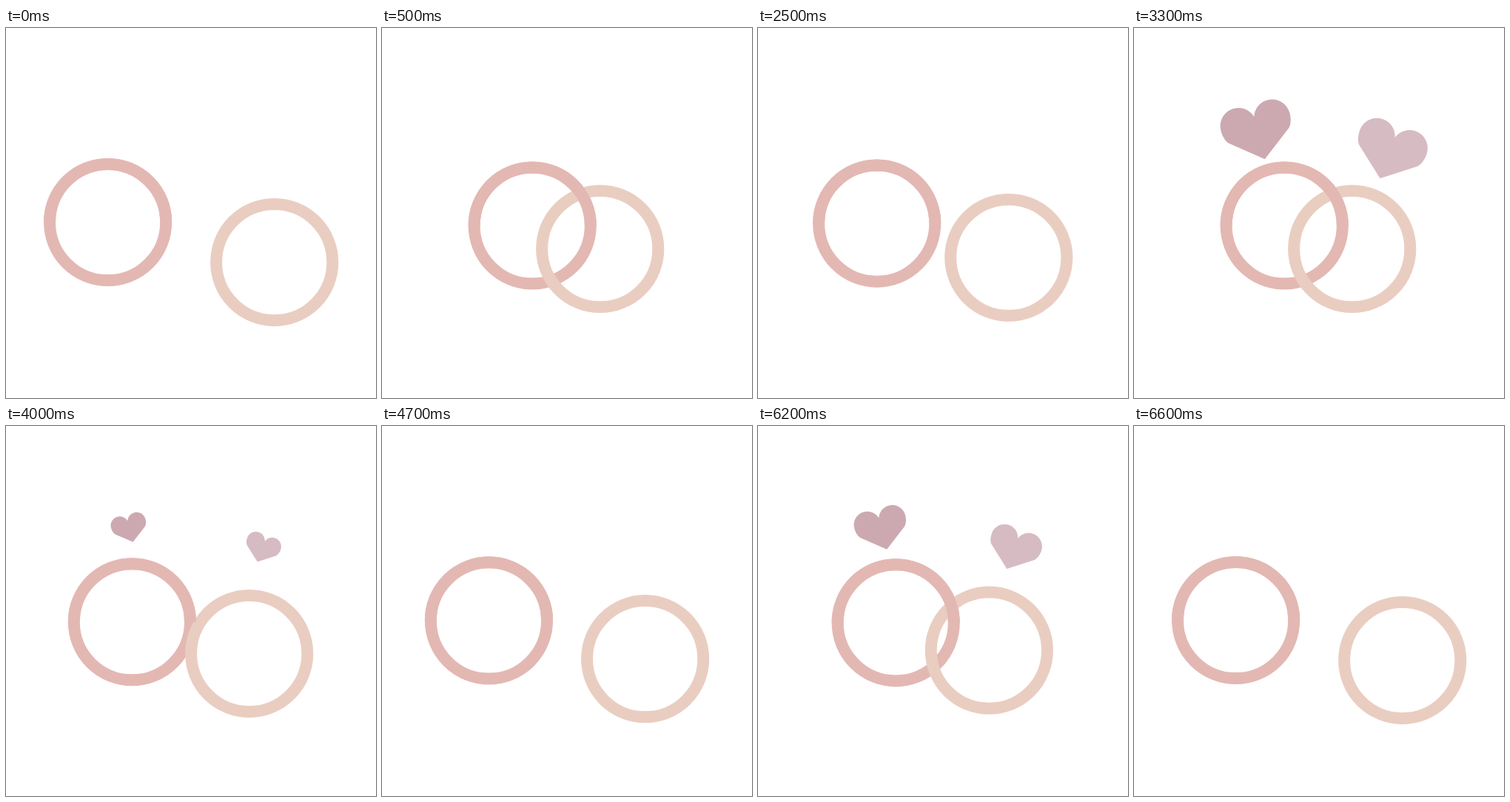
Write an HTML page that moves like this. It is 500x500 px and loops after 6.91 s.

```html
<!DOCTYPE html>
<html lang="en">
<head>
<meta charset="utf-8">
<title>Rings and hearts</title>
<style>
  html, body { margin: 0; width: 100%; height: 100%; overflow: hidden; background: #fff; }
  svg { display: block; width: 100%; height: 100%; }
  .ring { fill: none; stroke-width: 16; }
  .left { stroke: #e3b8b3; }
  .right { stroke: #eacdc1; }
  .slide-left {
    transform: translate(calc(137.6px + 65.6px * var(--join)), calc(262.5px + 4.5px * var(--join)));
  }
  .slide-right {
    transform: translate(calc(362.7px - 68px * var(--join)), calc(316.6px - 18.1px * var(--join)));
  }
  .heart-a { fill: #cca9b1; transform: translate(166.4px, 136.5px) rotate(-14.3deg) scale(var(--grow)); }
  .heart-b { fill: #d7bbc2; transform: translate(346.9px, 163.8px) rotate(20deg) scale(var(--grow)); }
</style>
</head>
<body>
<svg id="stage" viewBox="0 0 500 500" style="--join:0;--grow:0">
  <defs>
    <path id="heart" transform="translate(0 -17)"
      d="M0 0C3-10 12-17.5 23.5-17.5C37-17.5 48-6.5 48 7C48 14.5 46 23 41 27L0 59
         L-41 27C-46 23-48 14.5-48 7C-48-6.5-37-17.5-23.5-17.5C-12-17.5-3-10 0 0Z"/>
  </defs>
  <g class="slide-left"><circle class="ring left" r="78.6"/></g>
  <g class="slide-right"><circle class="ring right" r="78.6"/></g>
  <!-- upper half again, so the rings interlock -->
  <g class="slide-left"><path class="ring left" d="M-78.6 0A78.6 78.6 0 0 1 78.6 0"/></g>
  <g class="heart-a"><use href="#heart"/></g>
  <g class="heart-b"><use href="#heart"/></g>
</svg>
<script>
  const LOOP = 6910, CYCLE = 2300, STEP = 100;
  const stage = document.getElementById('stage');

  // Smooth 0..1 ramp between two times
  function ramp(t, from, to) {
    const x = Math.min(1, Math.max(0, (t - from) / (to - from)));
    return x * x * (3 - 2 * x);
  }

  function draw(now) {
    const t = Math.floor((now % LOOP) / STEP) * STEP % CYCLE;
    const back = ramp(t, 1400, 2000);
    stage.style.setProperty('--join', ramp(t, 0, 500) - back);
    stage.style.setProperty('--grow', ramp(t, 500, 1000) - back);
  }

  function tick() {
    draw(performance.now());
    requestAnimationFrame(tick);
  }
  tick();
</script>
</body>
</html>
```
